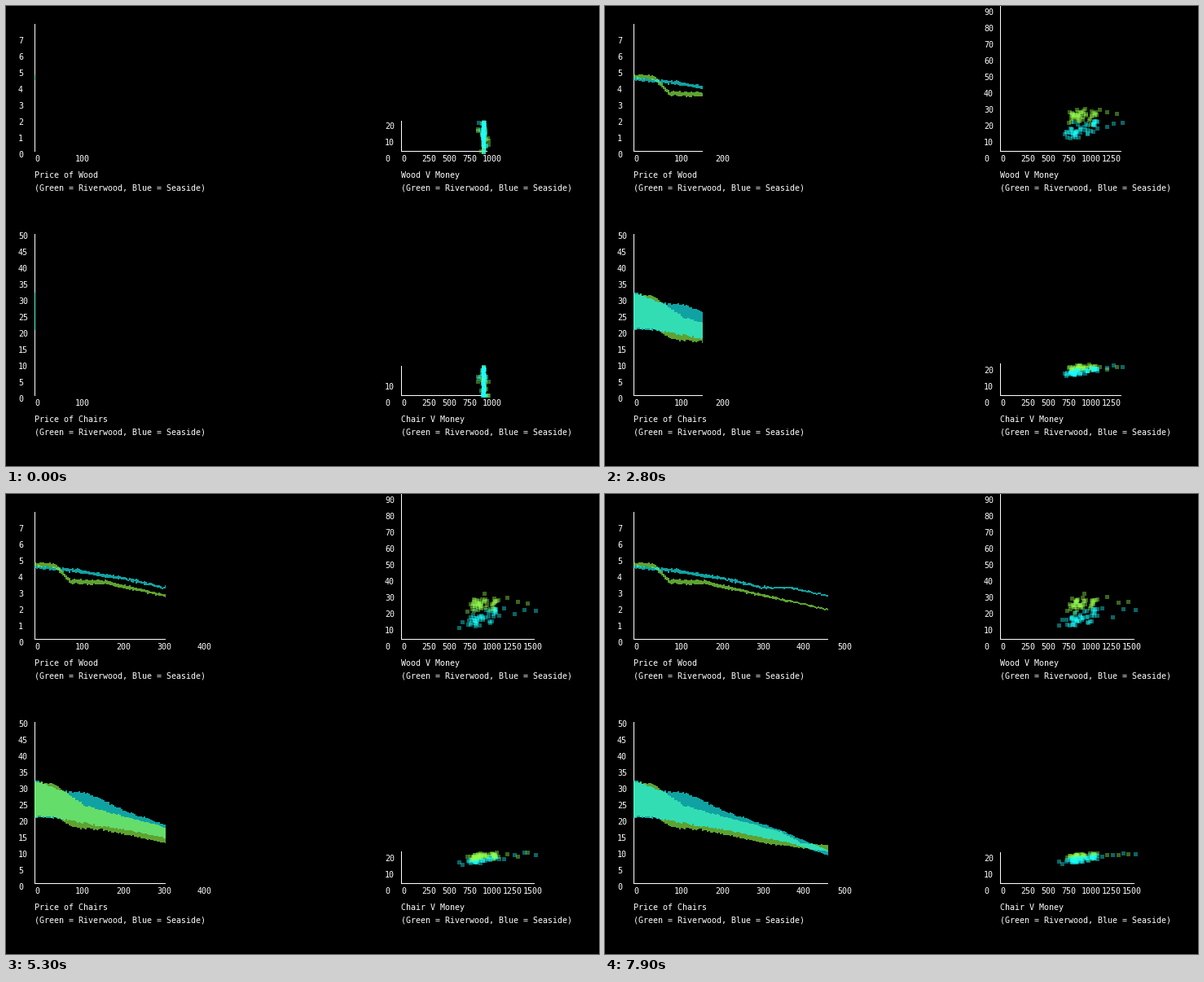
These frames come from a looping animation (728 px wide and 565 px high, 8000 ms). A matplotlib script:

```python
import numpy as np
import matplotlib.pyplot as plt
from matplotlib.animation import FuncAnimation
from matplotlib.patches import Rectangle

W, H, DPI = 728, 565, 80
PX = 72 / DPI
FRAMES, INTERVAL = 80, 100
GREEN = (0.58, 1.0, 0.30)
BLUE = (0.10, 1.0, 1.0)
LEGEND = "(Green = Riverwood, Blue = Seaside)"
rng = np.random.default_rng(11)

plt.rcParams["font.family"] = "DejaVu Sans Mono"
fig = plt.figure(figsize=(W / DPI, H / DPI), dpi=DPI, facecolor="black")
ax = fig.add_axes([0, 0, 1, 1])
ax.set_xlim(0, W)
ax.set_ylim(H, 0)
ax.axis("off")


def label(x, mid, text):
    return ax.text(x, mid + 4, text, color="white", size=10 * PX, va="baseline")


def bar(x, y, w, h):
    return ax.add_patch(Rectangle((x, y), w, h, color="white", lw=0,
                                  antialiased=False, zorder=1))


def titles(x, base, text):
    label(x, base + 29, text)
    label(x, base + 44, LEGEND)


class PriceChart:
    """Price bands that grow to the right, half a pixel per tick."""

    def __init__(self, title, top, base, step, count, green, blue):
        titles(35, base, title)
        bar(35, top, 1, base + 1 - top)
        self.floor = bar(35, base, 1, 1)
        for k in range(count + 1):
            label(15, base + 4 - 20 * k, str(k * step))
        self.ticks = [label(35 + 50 * k, base + 9, str(100 * k)) for k in range(6)]
        self.x = np.arange(35, 281, 2)
        self.bands = [self.make_band(green(self.x), GREEN),
                      self.make_band(blue(self.x), BLUE)]

    def make_band(self, edges, color):
        rough = np.interp(self.x, [35, 270], [0.8, 0.3])
        lo, hi = (np.round(y + rough * rng.normal(size=y.size)) for y in edges)
        shape = ax.fill_between([35, 36], 0, 1, color=color, alpha=0.64, lw=0,
                                antialiased=False)
        return shape, lo, np.maximum(hi, lo + 2)

    def draw(self, edge, green_on_top):
        self.floor.set_width(edge - 35)
        for k, tick in enumerate(self.ticks):
            tick.set_visible(k <= 2 * (edge - 35) // 100 + 1)
        n = np.count_nonzero(self.x < edge)
        xs = np.repeat(np.append(self.x[:n], edge), 2)[1:-1]
        for i, (shape, lo, hi) in enumerate(self.bands):
            upper = np.column_stack([xs, np.repeat(lo[:n], 2)])
            lower = np.column_stack([xs, np.repeat(hi[:n], 2)])
            shape.set_verts([np.vstack([upper, lower[::-1]])])
            shape.set_zorder(3 if (i == 0) == green_on_top else 2)


def path(*points):
    return lambda x: np.interp(x, *zip(*points))


def thin(center, start):
    """A band around a centre line, narrowing to two pixels."""
    def edges(x):
        half = np.interp(x, [35, 110, 240], [start, start, 2]) / 2
        return center(x) - half, center(x) + half
    return edges


def between(upper, lower):
    return lambda x: (upper(x), lower(x))


wood = PriceChart(
    "Price of Wood", 22, 178, 1, 7,
    thin(path((35, 86), (60, 88), (78, 108), (118, 108), (200, 126), (273, 142)), 5),
    thin(path((35, 89), (90, 95), (155, 106), (192, 115), (225, 115), (273, 125)), 4))
chairs = PriceChart(
    "Price of Chairs", 280, 478, 5, 10,
    between(path((35, 353), (60, 357), (96, 383), (215, 415), (240, 429), (273, 431)),
            path((35, 396), (62, 397), (80, 409), (120, 413), (196, 429), (273, 439))),
    between(path((35, 352), (68, 365), (98, 367), (147, 390), (215, 413), (273, 438)),
            path((35, 397), (60, 398), (147, 413), (225, 428), (273, 444))))

T = np.arange(FRAMES)


def wander(count, size):
    """Smooth random offsets, one row per frame."""
    kernel = np.hanning(11)[1:-1]
    kernel /= np.sqrt((kernel ** 2).sum())
    raw = rng.normal(0, size, (count, FRAMES + 8))
    return np.array([np.convolve(r, kernel, "valid") for r in raw]).T


def pulse(at, width):
    return np.exp(-((T - at) / width) ** 2)


def town(outliers, wood_mid, wood_slope, chair_mid, chair_slope, hoarders, peak):
    """Money, wood and chair positions, indexed by frame and trader."""
    core, t = 46, T[:, None]
    count = core + len(outliers)
    mix = 1 - np.exp(-t / 3)

    reach = np.append(rng.uniform(-21, 18, core), outliers)
    reach[:hoarders] *= 0.6
    growth = np.where(np.arange(count) < core, mix, np.minimum(t / 38, 1))
    start = np.clip(rng.standard_cauchy(count) * 0.4, -7, 6)
    dx = (1 - mix) * start + growth * reach + mix * wander(count, 1)

    hoard = np.zeros(count)
    hoard[:hoarders] = peak * np.linspace(0.4, 1, hoarders) ** 2
    surge = np.interp(t, [0, 5, 12, 18], [0, 1.3, 1, 0])
    w = wood_mid - wood_slope * np.minimum(dx, 25)
    w = w + rng.normal(0, 3.5, count) + wander(count, 1.6)
    w = (1 - mix) * rng.uniform(141, 178, count) + mix * w - surge * hoard

    c = chair_mid - chair_slope * dx
    c = c + rng.normal(0, 1.7, count) + wander(count, 0.8)
    c = (1 - mix) * rng.uniform(441, 478, count) + mix * np.clip(c, 439, 456)
    return 585 + dx, w, c


green_town = town([55, 42, 28, 13], 133, 0.15, 443, 0.1, 13, 134)
blue_town = town([-31, -27, 24, 38, 52, 65], 150, 0.36, 448, 0.13, 3, 80)

# One trader hoards wood far off the scale; two stock up on chairs for a while.
green_town[1][:, -1] -= np.minimum(T / 6, 1) * (
    163 - 114 * pulse(20, 3) - 31 * (T / (FRAMES - 1)) ** 6)
green_town[2][:, -2] -= 20 * pulse(12, 4) + 16 * pulse(37, 4)
blue_town[2][:, -1] -= 42 * pulse(20, 4)


class ScatterChart:
    """Goods against money; the axes reach as far as the traders do."""

    def __init__(self, title, base, column):
        titles(485, base, title)
        self.base = base
        self.side = bar(485, base, 1, 1)
        self.floor = bar(485, base, 1, 1)
        self.y_ticks = [label(465, base + 9 - 20 * k, str(10 * k)) for k in range(10)]
        self.x_ticks = [label(485 + 25 * k, base + 9, str(250 * k)) for k in range(7)]
        self.towns = []
        for data, color in ((green_town, GREEN), (blue_town, BLUE)):
            dots = ax.scatter([], [], s=(5 * PX) ** 2, marker="s", color=[color],
                              alpha=0.4, linewidths=0, antialiased=False)
            self.towns.append((dots, np.round(data[0]), np.round(data[column])))

    def draw(self, n, green_on_top):
        right = max(x[n].max() for _, x, _ in self.towns)
        top = max(0, min(y[n].min() for _, _, y in self.towns))
        self.floor.set_width(right - 485)
        self.side.set_y(top)
        self.side.set_height(self.base + 1 - top)
        for k, tick in enumerate(self.x_ticks):
            tick.set_visible(485 + 25 * k <= right)
        for k, tick in enumerate(self.y_ticks):
            tick.set_visible(self.base - 20 * k >= top - 3)
        for i, (dots, x, y) in enumerate(self.towns):
            dots.set_offsets(np.column_stack([x[n], y[n]]) + 0.5)
            dots.set_zorder(3 if (i == 0) == green_on_top else 2)


scatters = [ScatterChart("Wood V Money", 178, 1), ScatterChart("Chair V Money", 478, 2)]


def update(n):
    edge = round(35.9 + 3.015 * n)
    green_on_top = 45 <= n <= 71
    for chart in (wood, chairs):
        chart.draw(edge, green_on_top)
    for chart in scatters:
        chart.draw(n, green_on_top)
    return []


anim = FuncAnimation(fig, update, frames=FRAMES, interval=INTERVAL, repeat=True,
                     repeat_delay=0, init_func=lambda: [], blit=False)
plt.show()
```
